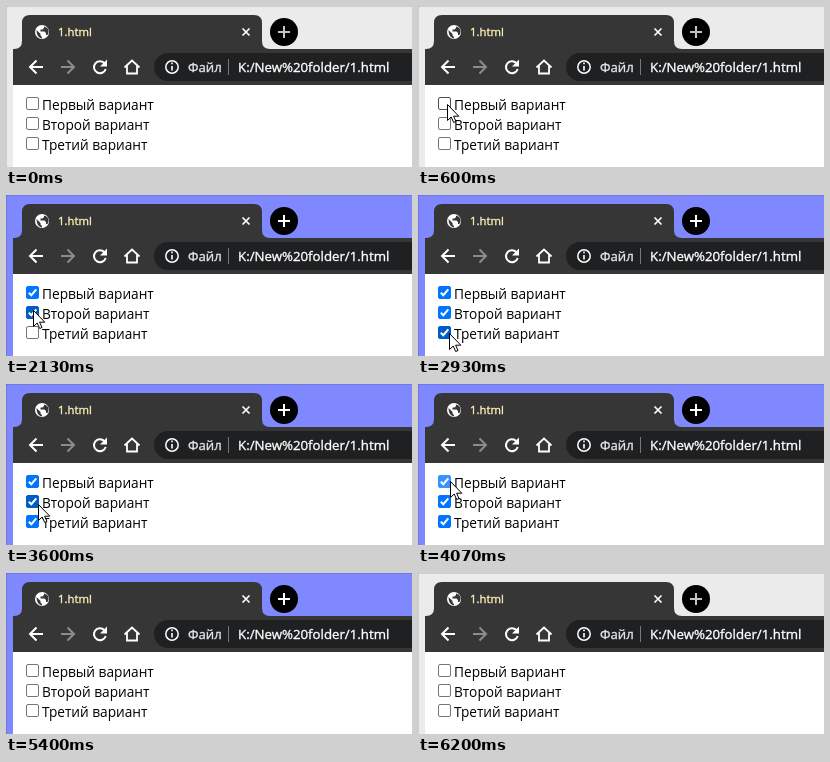
These frames come from a looping animation (406x161 px, 6.27 s). An HTML page:

```html
<!DOCTYPE html>
<html lang="ru">
<head>
<meta charset="utf-8">
<style>
html, body { margin: 0; width: 100%; height: 100%; overflow: hidden; background: #fff; }
svg { display: block; width: 406px; height: 161px; font-family: "Open Sans", "Noto Sans", sans-serif; }
.line { fill: none; stroke: #fff; stroke-width: 2; }
.bold { stroke-width: .35; }
</style>
</head>
<body>
<svg viewBox="0 0 406 161">
  <rect id="frame" width="406" height="161"/>
  <path d="M0 .5H406M.5 0V161" stroke="#000" stroke-opacity=".12"/>
  <rect x="7" y="79" width="399" height="82" fill="#fff"/>

  <!-- tab and toolbar -->
  <path d="M7 79V43H8Q16 43 16 35V17Q16 9 24 9H248Q256 9 256 17V35Q256 43 264 43H406V79Z" fill="#363636"/>
  <circle cx="36" cy="26" r="7" fill="#fff"/>
  <path d="M30.500 24l4 4v1.500l1.500 1.500v1.500q-5.500-1-5.500-8.500zM38 20.500v1.500l-1.500 1.500h-2v2h4l1.500 1.500v2h1.500q2-3 .5-6-1-2-4-2.500z" fill="#363636"/>
  <text class="bold" x="52" y="30" font-size="11.300" fill="#fff0b8" stroke="#fff0b8">1.html</text>
  <path class="line" d="M236.500 22.500l7 7m0-7l-7 7" style="stroke-width:1.700"/>
  <circle cx="278" cy="26" r="14" fill="#000"/>
  <path id="plus" class="line" d="M272 26h12m-6-6v12"/>

  <path class="line" d="M37 61H24.500M30.500 54.500L24 61l6.500 6.500"/>
  <path class="line" d="M55 61h12.500M61.500 54.500L68 61l-6.500 6.500" style="stroke:#8c8c8c"/>
  <path class="line" d="M98.300 57A6 6 0 1 0 99.700 63"/>
  <path d="M101 53.500v7h-7z" fill="#fff"/>
  <path class="line" d="M118.500 61.500L126 54.500l7.500 7M121 60v7.500h10V60" style="stroke-width:1.800"/>

  <path d="M406 47H162a14 14 0 0 0 0 28H406Z" fill="#1f2022"/>
  <circle class="line" cx="166" cy="61" r="6.200" style="stroke-width:1.500"/>
  <path class="line" d="M166 60v4.500m0-8v1.700" style="stroke-width:1.600"/>
  <text class="bold" x="182" y="66" font-size="13.200" fill="#e4e6e8" stroke="#e4e6e8">Файл</text>
  <path d="M222.500 53v16" stroke="#77797c"/>
  <text class="bold" x="232" y="66" font-size="13.250" fill="#fff" stroke="#fff">K:/New%20folder/1.html</text>

  <g id="list" font-size="13.700"></g>
  <path id="cursor" d="M.5 .5V16.500L4.200 13 6.700 18.500 9 17.500 6.600 12.200H11.800Z" fill="#fff" stroke="#000" stroke-linejoin="round"/>
</svg>
<script>
const $ = id => document.getElementById(id);
const TICK = 200 / 3, LOOP = 6270;

// pointer tip: tick, x, y
const path = [
  [1, 6, 127], [10, 30, 97], [14, 28, 93], [21, 28, 93], [28, 27, 115], [32, 27, 115],
  [37, 30, 138], [39, 30, 138], [40, 31, 138], [45, 31, 138], [55, 32, 119], [59, 32, 97],
  [62, 32, 97], [65, 30, 115], [69, 30, 115], [74, 30, 134], [77, 30, 134], [81, 44, 163]
];
// ticks at which each box is ticked and cleared; it is pressed one tick earlier
const rows = [
  { text: 'Первый вариант', on: 17, off: 62 },
  { text: 'Второй вариант', on: 32, off: 69 },
  { text: 'Третий вариант', on: 44, off: 77 }
];

rows.forEach((row, i) => {
  row.y = 91 + 20 * i;
  $('list').insertAdjacentHTML('beforeend', `<g transform="translate(20 ${row.y})">
    <rect x=".5" y=".5" width="12" height="12" rx="1.500"/>
    <path class="line" d="M2.800 6.700L5.300 9.200 10.300 3.300"/>
    <text x="16" y="13">${row.text}</text></g>`);
  [row.box, row.mark] = $('list').lastElementChild.children;
});

function tipAt(k) {
  const i = path.findIndex(p => p[0] > k);
  if (i < 1) return null;
  const [a, b] = [path[i - 1], path[i]];
  const u = (k - a[0]) / (b[0] - a[0]), e = u * u * (3 - 2 * u);
  return [1, 2].map(n => Math.round(a[n] + (b[n] - a[n]) * e));
}

function draw(now) {
  const k = Math.floor((now % LOOP + 4) / TICK);
  const tip = tipAt(k);
  const active = k >= 16 && k < 93;
  $('frame').setAttribute('fill', active ? '#8088ff' : '#ebebeb');
  $('plus').style.stroke = active ? '#fff' : '#c4c4c4';
  $('cursor').style.display = tip ? '' : 'none';
  if (tip) $('cursor').setAttribute('transform', `translate(${tip})`);

  for (const { y, on, off, box, mark } of rows) {
    const checked = k >= on && k < off;
    const hover = tip && tip[0] >= 20 && tip[0] < 33 && tip[1] >= y && tip[1] < y + 13;
    const pressed = k === off - 1 || (k === on - 1 && k !== 16);
    const state = pressed ? 2 : hover ? 1 : 0;
    const color = (checked ? ['#0075ff', '#005cc8', '#3793ff'] : ['#767676', '#4f4f4f', '#8d8d8d'])[state];
    box.setAttribute('stroke', color);
    box.setAttribute('fill', checked ? color : '#fff');
    mark.style.display = checked ? '' : 'none';
  }
}

const start = performance.now();
(function loop() {
  draw(performance.now() - start);
  requestAnimationFrame(loop);
})();
</script>
</body>
</html>
```
